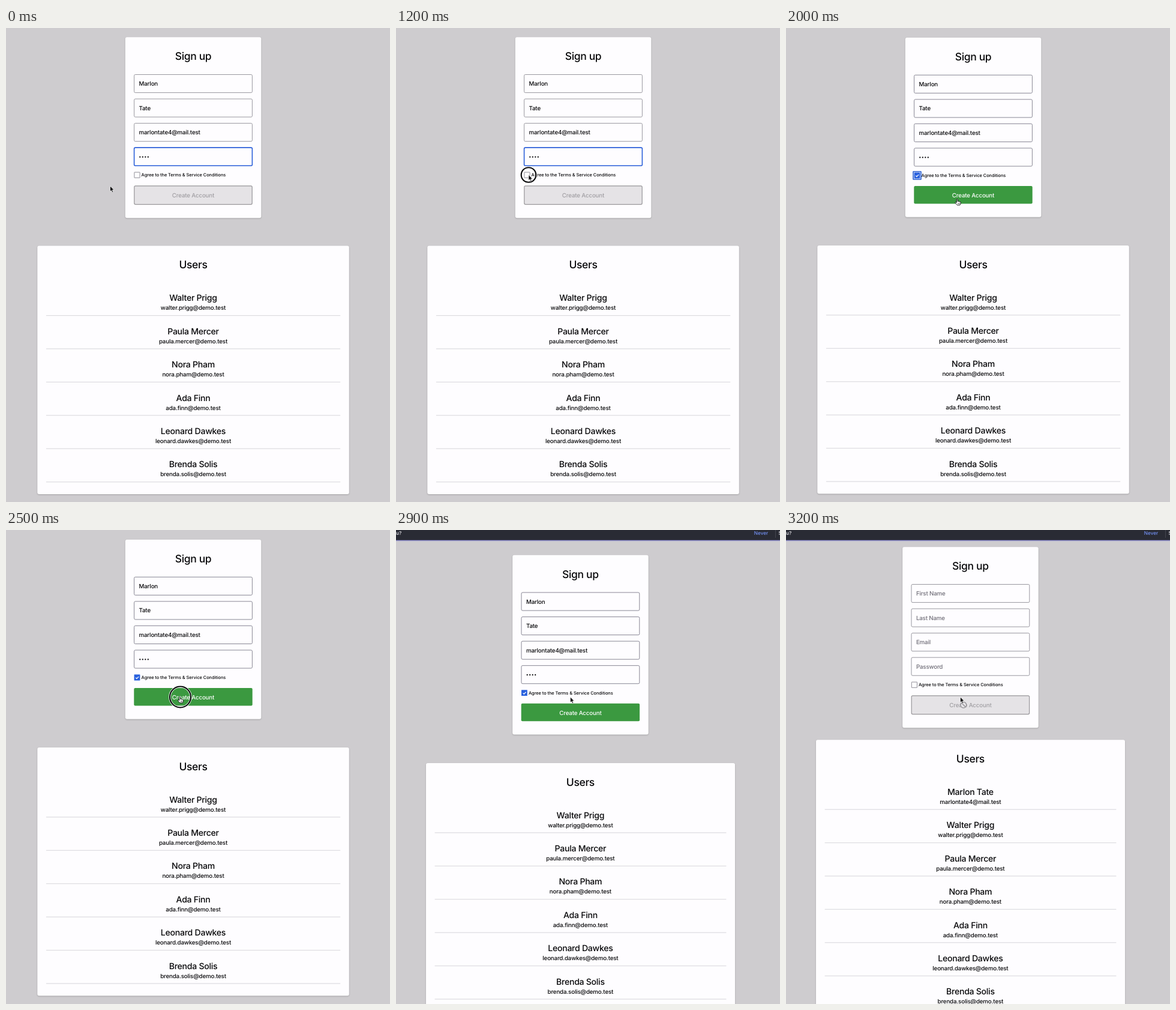
An HTML page that plays this animation: 640 px wide and 789 px high, repeating every 3500 ms.

```html
<!DOCTYPE html>
<html lang="en">
<head>
<meta charset="utf-8">
<title>Sign up</title>
<style>
  html, body { margin: 0; width: 100%; height: 100%; overflow: hidden; background: #cecccf; }
  svg { display: block; width: 640px; height: 789px; }
  text {
    font-family: Inter, "Open Sans", sans-serif; font-weight: 450;
    fill: #08080a; white-space: pre; text-rendering: geometricPrecision;
  }
  .title { font-size: 17.5px; letter-spacing: -.35px; text-anchor: middle; }
  .name { font-size: 14.1px; letter-spacing: -.28px; text-anchor: middle; }
  .body { font-size: 9.75px; letter-spacing: -.17px; }
  .mid { text-anchor: middle; }
  .small { font-size: 7.4px; letter-spacing: -.06px; }
  .bar { font-size: 8.2px; }
  .card { fill: #fefdff; filter: drop-shadow(0 1px 1.3px rgba(0, 0, 0, .2)); }
</style>
</head>
<body>
<svg id="stage" viewBox="0 0 640 789"></svg>
<script>
const LOOP = 3500, STEP = 100;
const stage = document.getElementById('stage');

const account = { first: 'Marlon', last: 'Tate', email: 'marlontate4@mail.test' };
const people = ['Walter Prigg', 'Paula Mercer', 'Nora Pham', 'Ada Finn', 'Leonard Dawkes', 'Brenda Solis']
  .map(name => ({ name, email: name.toLowerCase().replace(' ', '.') + '@demo.test' }));
const joined = { name: `${account.first} ${account.last}`, email: account.email };

// Page states: starting step, card offsets, users card edges
const states = [
  { from: 0, dx: 0, formY: 0, usersY: 0, left: 52.3, right: 571.8 },
  { from: 13, dx: 0, formY: .8, usersY: -.7, left: 52.3, right: 571.8, agreed: true },
  { from: 26, dx: -4.6, formY: 26.5, usersY: 25.3, left: 50, right: 565, agreed: true },
  { from: 30, dx: -4.6, formY: 13, usersY: -13.4, left: 50, right: 565, done: true }
];

// Pointer path: step, x, y
const path = [
  [0, 173.5, 263], [1, 173, 263.5], [2, 173, 263.5], [3, 202, 312], [4, 262, 400], [5, 315, 435],
  [6, 302, 345], [7, 270, 248], [8, 248, 209], [9, 231, 226], [10, 222, 242], [11, 221, 244.5],
  [14, 221, 244.5], [15, 232, 282], [16, 272, 380], [17, 304, 437], [18, 296, 385],
  [19, 287, 312], [20, 286, 285], [23, 290.5, 278], [35, 290.5, 278]
];
const rings = { 11: 17.5, 12: 12.3, 25: 17.5 };

const text = (s, x, y, cls, fill) =>
  `<text x="${x}" y="${y}" class="${cls}"${fill ? ` style="fill:${fill}"` : ''}>${s}</text>`;
const rect = (x, y, w, h, r, attrs) =>
  `<rect x="${x}" y="${y}" width="${w}" height="${h}" rx="${r}" ${attrs}/>`;
const shift = (x, y, inner) => `<g transform="translate(${x} ${y})">${inner}</g>`;
const mix = (a, b, k) => `rgb(${a.map((v, i) => Math.round(v + (b[i] - v) * k))})`;

function pointerAt(step) {
  const i = Math.max(1, path.findIndex(p => p[0] >= step));
  const [s0, x0, y0] = path[i - 1], [s1, x1, y1] = path[i];
  const k = (step - s0) / (s1 - s0);
  return [x0 + (x1 - x0) * k, y0 + (y1 - y0) * k];
}

function field(i, value, hint, focused, agreed) {
  const y = 77.5 + i * 40.55;
  const line = focused ? 'stroke="#2b5fd9" stroke-width="1.6"'
    : `stroke="${agreed ? '#7b7a88' : '#8e8d95'}" stroke-width=".9"`;
  let out = rect(213.6, y, 196.8, 30.1, 2, `fill="#fefdff" ${line}`);
  if (!value) out += text(hint, 221.5, y + 18.6, 'body', '#706e78');
  else if (hint !== 'Password') out += text(value, 221.5, y + 18.6, 'body');
  else for (let n = 0; n < 4; n++)
    out += `<circle cx="${223.3 + n * 4.5}" cy="${y + 15.5}" r="1.15" fill="#0a0a0c"/>`;
  return out;
}

function checkbox(agreed, focused) {
  if (!agreed) return rect(213.9, 240.1, 9.2, 9.2, .3, 'fill="#fefdff" stroke="#85848c" stroke-width=".9"');
  const halo = focused ? rect(212, 238.2, 13, 13, .3, 'fill="#fefdff" stroke="#2a5fd0" stroke-width="1.6"') : '';
  return halo + rect(213.6, 239.8, 9.8, 9.8, .3, 'fill="#2860de"') +
    '<path d="M216.2 244.9l1.7 1.7 3.2-3.3" fill="none" stroke="#fff" stroke-width="1.3"/>';
}

function button(state, step) {
  if (!state.agreed)
    return rect(213.8, 262.8, 196.4, 30.8, 2, 'fill="#e5e3e6" stroke="#98969a" stroke-width="1.2"') +
      text('Create Account', 312, 282, 'body mid', '#a19fa3');
  const k = Math.min(1, (step - 12) / 3);
  return rect(213.3, 262.3, 197.4, 29.5, 2, `fill="${mix([229, 227, 230], [59, 153, 64], k)}"`) +
    text('Create Account', 312, 281, 'body mid', mix([161, 159, 163], [255, 255, 255], k));
}

function form(state, step) {
  const v = state.done ? {} : account;
  return shift(state.dx, state.formY,
    rect(198.8, 15.2, 226.5, state.agreed ? 298.8 : 301, 3, 'class="card"') +
    text('Sign up', 312, 53, 'title') +
    field(0, v.first, 'First Name', false, state.agreed) +
    field(1, v.last, 'Last Name', false, state.agreed) +
    field(2, v.email, 'Email', false, state.agreed) +
    field(3, !state.done, 'Password', step < 13, state.agreed) +
    checkbox(state.agreed, step < 25) +
    text('Agree to the Terms &amp; Service Conditions', 225.6, 247, 'small') +
    button(state, step));
}

function users(state) {
  const list = state.done ? [joined, ...people] : people;
  const { left, right } = state, cx = 312 + state.dx;
  let out = rect(left, 362.6, right - left, 81 + list.length * 55.4, 3, 'class="card"') +
    text('Users', cx, 400.3, 'title');
  list.forEach((p, i) => {
    const y = 478.6 + i * 55.4;
    out += text(p.name, cx, y - 24.2, 'name') + text(p.email, cx, y - 9.2, 'body mid') +
      rect(left + 14.6, y - .6, right - left - 29.2, 1.2, 0, 'fill="#dddce0"');
  });
  return shift(0, state.usersY, out);
}

function topBar(step) {
  if (step < 27) return '';
  return shift(0, Math.min(0, (step - 29) * 6),
    rect(0, -2, 640, 19, 0, 'fill="#292b34"') +
    rect(0, 16.8, 640, 1.5, 0, 'fill="#8c8acb"') +
    text('u?', 0, 8, 'bar', '#eeedf2') +
    text('Never', 596.8, 8, 'bar', '#7391f4') +
    rect(632, 0, .8, 13, 0, 'fill="#4b4d57"') +
    text('S', 637.6, 8, 'bar', '#eeedf2'));
}

const arrow = '<path d="M0 0V9.2L2.1 7.3 3.6 10.8 5.2 10.1 3.7 6.7H6.6Z" fill="#08080a" stroke="#fff" stroke-width=".7" stroke-linejoin="round"/>';
const hand = '<path d="M-1.7 5.2V.8Q-1.7-.4-.8-.4T.1.8V3.6Q1.2 2.8 1.9 3.9 3 3.2 3.6 4.3 5.2 3.8 5.2 5.6 5.2 8 3.9 9.8H-.7Q-1.8 8.4-3.9 6.2-4.4 5-3.3 4.8-2.4 4.7-1.7 5.8Z" fill="#fff" stroke="#0a0a0c" stroke-width=".9" stroke-linejoin="round"/>' +
  '<path d="M.7 6V8.3M2 6V8.3M3.3 6V8.3" stroke="#0a0a0c" stroke-width=".5"/>';
const denied = '<g fill="#e5e3e6" stroke="#8d8b90" stroke-width="1.2"><circle cx="5.3" cy="13.2" r="4.9"/><path d="M2 9.9L8.6 16.5"/></g>';

function pointer(state, step) {
  const [x, y] = pointerAt(step);
  const r = rings[step];
  const ring = r ? `<g fill="none"><circle r="${r}" stroke="#fff" stroke-opacity=".85" stroke-width="3.8"/><circle r="${r}" stroke="#08080a" stroke-width="2.1"/></g>` : '';
  const shape = step >= 20 && step < 26 ? hand : state.done ? denied + arrow : arrow;
  return shift(x, y, ring + shape);
}

let shown = -1;
const start = performance.now();
function frame() {
  const step = Math.floor(((performance.now() - start) % LOOP) / STEP);
  if (step !== shown) {
    shown = step;
    const state = states.filter(s => s.from <= step).pop();
    stage.innerHTML = rect(0, 0, 640, 789, 0, 'fill="#cecccf"') +
      form(state, step) + users(state) + topBar(step) + pointer(state, step);
  }
  requestAnimationFrame(frame);
}
frame();
</script>
</body>
</html>
```
